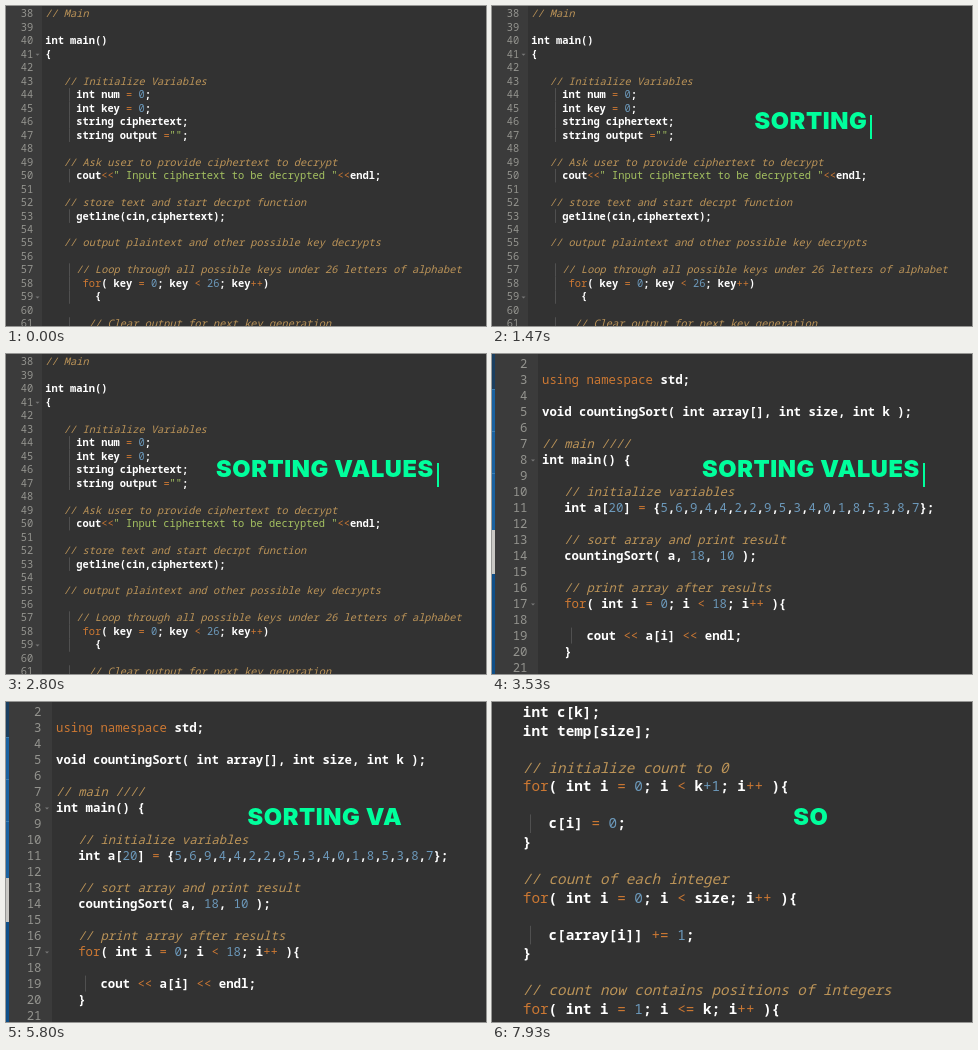
An HTML page with a canvas that plays this animation: 480 px wide and 320 px high, repeating every 8 s.

```html
<!DOCTYPE html>
<html>
<head>
<meta charset="utf-8">
<style>
  html, body { margin: 0; width: 100%; height: 100%; overflow: hidden; background: #323232; }
  canvas { display: block; }
</style>
</head>
<body>
<canvas id="stage" width="480" height="320"></canvas>
<script>
const ctx = document.getElementById('stage').getContext('2d');
const LOOP = 8000, BLINK = 2800 / 3;
const TITLE = 'SORTING VALUES', GREEN = '#00ff9c', SPACING = 0.6;

// start: time shown from; x: left edge of code; y: first baseline; step: line pitch; adv: character width
const scenes = [
  { start: 0, x: 39.2, y: 11.3, step: 13.48, adv: 6.22, guide: 4, first: 38, gutter: 36, numRight: 27.3, foldX: 31.5, folds: [41, 59],
    code: `// Main

int main()
{

   // Initialize Variables
     int num = 0;
     int key = 0;
     string ciphertext;
     string output ="";

   // Ask user to provide ciphertext to decrypt
     cout<<" Input ciphertext to be decrypted "<<endl;

   // store text and start decrpt function
     getline(cin,ciphertext);

   // output plaintext and other possible key decrypts

     // Loop through all possible keys under 26 letters of alphabet
      for( key = 0; key < 26; key++)
        {

       // Clear output for next key generation` },
  { start: 2933, x: 50, y: 13.6, step: 16, adv: 7.4, guide: 4, first: 2, gutter: 46, numRight: 35.5, foldX: 41, folds: [8, 17], sidebar: true,
    code: `
using namespace std;

void countingSort( int array[], int size, int k );

// main ////
int main() {

   // initialize variables
   int a[20] = {5,6,9,4,4,2,2,9,5,3,4,0,1,8,5,3,8,7};

   // sort array and print result
   countingSort( a, 18, 10 );

   // print array after results
   for( int i = 0; i < 18; i++ ){

      cout << a[i] << endl;
   }
` },
  { start: 5867, x: 30.8, y: 15, step: 18.56, adv: 8.58, guide: 1,
    code: `int c[k];
int temp[size];

// initialize count to 0
for( int i = 0; i < k+1; i++ ){

   c[i] = 0;
}

// count of each integer
for( int i = 0; i < size; i++ ){

   c[array[i]] += 1;
}

// count now contains positions of integers
for( int i = 1; i <= k; i++ ){` }
];

const TOKEN = /(\/\/.*)|("[^"]*")|(\b(?:for|using|namespace)\b|[+<>=]+(?!\d))|(\+?\b\d+)|\w+|[^\s\w]/g;
const COLORS = ['#bc9458', '#a5c261', '#cc7833', '#6c99bb'];

function rect(color, x, y, w, h) {
  ctx.fillStyle = color;
  ctx.fillRect(x, y, w, h);
}

function drawSidebar() {
  rect('#1b3f60', 0, 0, 3, 35);
  rect('#1a62a0', 0, 35, 3, 141);
  for (const y of [35, 77, 119]) rect('#3b7fb4', 0, y, 3, 1);
  rect('#c8c7c3', 0, 176, 3, 44);
  rect('#0f4f88', 0, 220, 3, 100);
}

function drawGutter(s, line, y) {
  const n = s.first + line;
  ctx.fillStyle = '#94948f';
  ctx.textAlign = 'right';
  ctx.fillText(n, s.numRight, y);
  ctx.textAlign = 'left';
  if (!s.folds.includes(n)) return;
  ctx.fillStyle = '#777';
  ctx.beginPath();
  ctx.moveTo(s.foldX - 2, y - 4);
  ctx.lineTo(s.foldX + 2, y - 4);
  ctx.lineTo(s.foldX, y - 2);
  ctx.fill();
}

function drawScene(s) {
  const font = s.adv / 0.6 + 'px "Noto Sans Mono", "DejaVu Sans Mono", monospace';
  rect('#323232', 0, 0, 480, 320);
  if (s.gutter) rect('#3b3b3b', 0, 0, s.gutter, 320);
  if (s.sidebar) drawSidebar();
  s.code.split('\n').forEach((text, i) => {
    const y = s.y + i * s.step;
    ctx.font = font;
    if (s.gutter) drawGutter(s, i, y);
    if (text.search(/\S/) > s.guide)
      rect('#505050', Math.floor(s.x + s.guide * s.adv - 0.5), y - s.step * 0.75, 1, s.step);
    for (const m of text.matchAll(TOKEN)) {
      const kind = m.slice(1).findIndex(Boolean);
      ctx.font = (kind === 0 ? 'italic 500 ' : kind < 0 ? '600 ' : '500 ') + font;
      ctx.fillStyle = COLORS[kind] || '#fff';
      ctx.fillText(m[0], s.x + m.index * s.adv, y);
    }
  });
}

function drawTitle(t) {
  const typed = t < 3800 ? t : t < 7533 ? t - 3800 : t - 7533;
  const text = TITLE.slice(0, Math.floor(typed / 199));
  ctx.font = '900 23.6px Inter, sans-serif';
  ctx.letterSpacing = SPACING + 'px';
  ctx.fillStyle = GREEN;
  const w = ctx.measureText(text).width;
  ctx.fillText(text, 318.9 - w / 2, 123.4);
  ctx.letterSpacing = '0px';
  const on = t > 67 && (t - 67) % BLINK >= BLINK / 2;
  if (on) rect(GREEN, Math.round(318.9 + w / 2 + 3), 109, 2, 24);
}

function frame(now) {
  const t = now % LOOP;
  drawScene(scenes.findLast(s => t >= s.start));
  drawTitle(t);
  requestAnimationFrame(frame);
}
requestAnimationFrame(frame);
</script>
</body>
</html>
```
